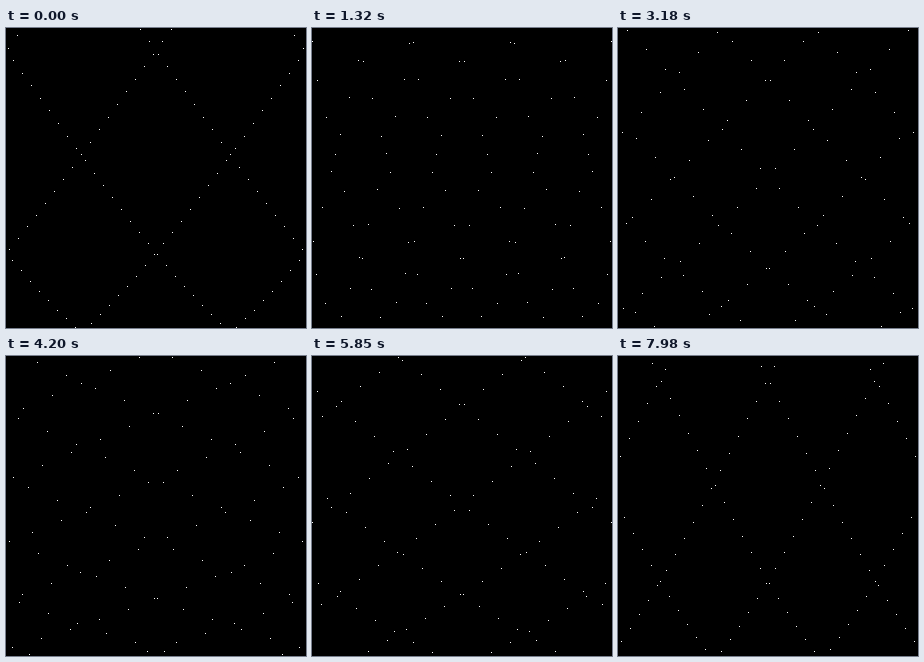
Write an HTML page with a canvas that moves like this. It is 300 by 300 pixels and loops after 8000 ms.

```html
<!DOCTYPE html>
<html lang="en">
<head>
<meta charset="utf-8">
<title>Cosine dots</title>
<style>
  html, body { margin: 0; width: 100%; height: 100%; overflow: hidden; background: #000; }
  canvas { display: block; width: 300px; height: 300px; image-rendering: pixelated; }
</style>
</head>
<body>
<canvas id="stage" width="300" height="300"></canvas>
<script>
  const SIZE = 300;
  const LOOP = 8000;
  const STEP = 30;          // ms per picture
  const SWING = 285;        // steps per swing of the frequency
  const MID = (SIZE - 1) / 2;

  const ctx = document.getElementById('stage').getContext('2d');
  const start = performance.now();

  // One dot per column, on a cosine far too fast for the column spacing.
  function draw(time) {
    const step = Math.floor(time / STEP);
    const freq = Math.PI * (32 + Math.cos(2 * Math.PI * step / SWING));

    ctx.fillStyle = '#000';
    ctx.fillRect(0, 0, SIZE, SIZE);
    ctx.fillStyle = '#fff';
    for (let x = 0; x < SIZE; x++) {
      const u = Math.abs(x - MID) / MID;
      const y = Math.floor(SIZE * (0.25 + Math.cos(freq * u)));
      if (y >= 0 && y < SIZE) ctx.fillRect(x, y, 1, 1);
    }
  }

  function tick() {
    draw((performance.now() - start) % LOOP);
    requestAnimationFrame(tick);
  }

  tick();
</script>
</body>
</html>
```
